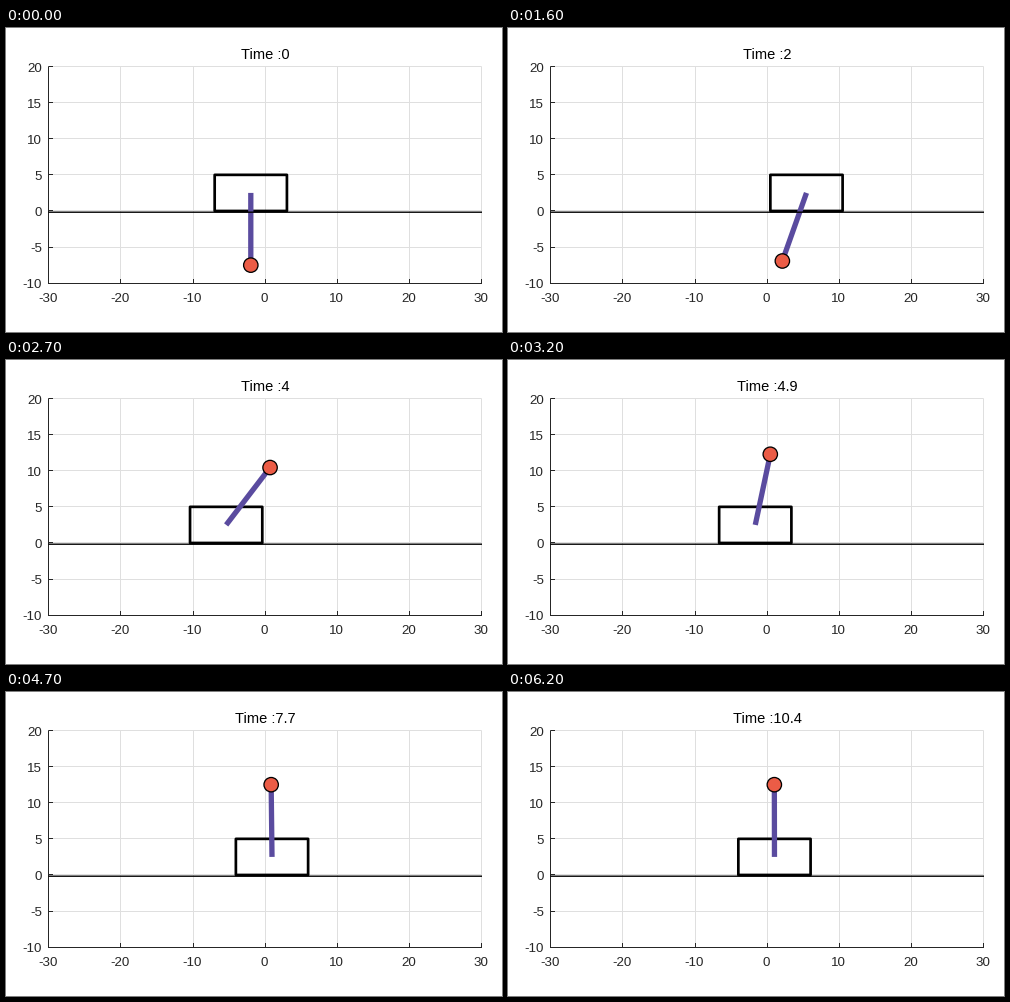
Recreate the animation shown at these times as a matplotlib script. Size 496x304 px, loop 6300 ms.

```python
import numpy as np
import matplotlib.pyplot as plt
from matplotlib.animation import FuncAnimation
from matplotlib.patches import Circle, Rectangle

W, H, DPI = 496, 304, 100
PX = 72 / DPI  # points per pixel
FRAMES, INTERVAL = 63, 100
DARK, GRID = "#262626", "#dfdfdf"
ROD, BOB = "#5a4b9f", "#eb5c46"
LENGTH, PIVOT_Y = 10, 2.5
LEFT, RIGHT, TOP, BOTTOM = 42.5, 475.5, 38.5, 255.5


def sx(x):
    return LEFT + (x + 30) * 433.5 / 60


def sy(y):
    return TOP + (20 - y) * 216.7 / 30


def smooth(n, start, end):
    u = np.clip((n - start) / (end - start), 0, 1)
    return u * u * (3 - 2 * u)


def cart_x(n):
    """Push right, pull back left, then settle critically damped at 1."""
    if n < 24.75:
        return -2 + 7.43 * smooth(n, 3, 14.75) - 11.98 * smooth(n, 16, 24.75)
    u = (n - 24.75) / 3.28
    return 1 - 7.55 * (1 + u) * np.exp(-u)


def rod_angle(n):
    """Degrees from hanging: lag behind, swing up, then balance upright."""
    if n < 23:
        return -27.5 * smooth(n, 3, 12) + 0.1774 * max(n - 12, 0) ** 2.747
    s = n - 23
    return 180 - 78.8 * np.exp(-s / 5.86) * np.cos(np.pi * s / 36)


def clock(n):
    """The clock starts late, then runs at a steady pace."""
    return 0.116 * max(n - 3, 0) + 0.0655 * max(n - 8, 0)


plt.rcParams["font.family"] = "Liberation Sans"
fig = plt.figure(figsize=(W / DPI, H / DPI), dpi=DPI, facecolor="white")
ax = fig.add_axes([0, 0, 1, 1])
ax.set_xlim(0, W)
ax.set_ylim(H, 0)
ax.axis("off")


def segment(x0, y0, x1, y1, color, width=1.0, z=1):
    return ax.plot([x0, x1], [y0, y1], color=color, lw=width * PX, zorder=z,
                   solid_capstyle="butt", snap=False)[0]


def label(x, y, text, size, color, ha):
    return ax.text(x, y, text, fontsize=size * PX, color=color, ha=ha,
                   va="baseline")


for value in range(-30, 31, 10):
    x = np.floor(min(sx(value), RIGHT)) + 0.5
    segment(x, TOP, x, BOTTOM, GRID)
    segment(x, BOTTOM, x, BOTTOM - 4.5, DARK, z=2)
    label(sx(value) - 0.8, 274, str(value), 13.33, DARK, "center")
for value in range(-10, 21, 5):
    y = np.floor(sy(value)) + 0.5
    segment(LEFT, y, RIGHT, y, GRID)
    segment(LEFT, y, LEFT + 4.5, y, DARK, z=2)
    label(36, sy(value) + 5, str(value), 13.33, DARK, "right")
segment(LEFT, TOP, LEFT, BOTTOM + 0.5, DARK, z=2)
segment(LEFT, BOTTOM, RIGHT + 0.5, BOTTOM, DARK, z=2)

title = label(259, 31, "", 14.67, "black", "center")
cart = Rectangle((0, sy(5)), sx(10) - sx(0), sy(0) - sy(5), fill=False,
                 ec="black", lw=2.7 * PX, joinstyle="round", zorder=3,
                 snap=False)
ax.add_patch(cart)
rod = segment(0, 0, 0, 0, ROD, 5.3, 4)
bob = Circle((0, 0), 7.2, fc=BOB, ec="black", lw=1.3 * PX, zorder=5)
ax.add_patch(bob)
segment(LEFT, 184.2, RIGHT + 0.5, 184.2, "black", 1.4, 6)


def draw(n):
    x, angle = cart_x(n), np.radians(rod_angle(n))
    tip_x = sx(x + LENGTH * np.sin(angle))
    tip_y = sy(PIVOT_Y - LENGTH * np.cos(angle))
    cart.set_x(sx(x - 5))
    rod.set_data([sx(x), tip_x], [sy(PIVOT_Y), tip_y])
    bob.center = tip_x, tip_y
    title.set_text(f"Time :{round(clock(n), 1):g}")
    return cart, rod, bob, title


anim = FuncAnimation(fig, draw, frames=FRAMES, interval=INTERVAL, repeat=True,
                     repeat_delay=0, blit=False)
plt.show()
```
